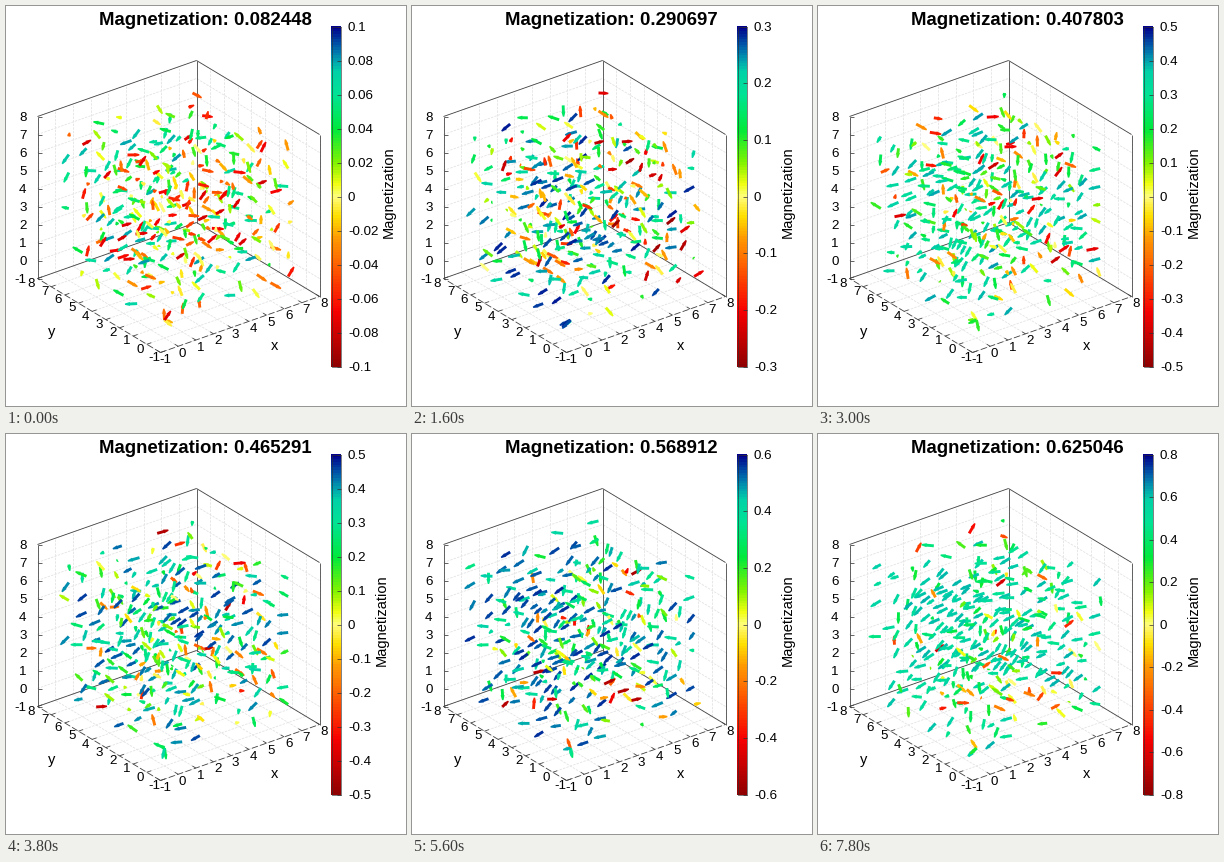
A matplotlib script for the animation above (8000 ms loop, 400x400 px).

```python
import numpy as np
import matplotlib.pyplot as plt
from matplotlib.animation import FuncAnimation
from matplotlib.collections import LineCollection, PolyCollection
from matplotlib.colors import LinearSegmentedColormap

SIZE, DPI = 400, 100
FRAMES, STEP_MS = 40, 200
N = 8                      # sites per lattice edge
LOW, HIGH = -1, 8          # axis limits
PX = 72 / DPI              # points per pixel

plt.rcParams["font.family"] = "Liberation Sans"

# Screen position of the front corner and the three unit vectors
ORIGIN = np.array([154, 346])
AXES = np.array([[159, -56], [-123, -74], [0, -162]]) / 9

STOPS = [
    (-1.0, "#900000"), (-0.68, "#f80000"), (-0.42, "#ff5c00"),
    (-0.25, "#ff9a00"), (-0.12, "#ffe000"), (0.0, "#ffff82"),
    (0.08, "#f0ff10"), (0.2, "#84f400"), (0.4, "#00ea3c"),
    (0.6, "#00e494"), (0.74, "#00d2a8"), (0.82, "#0094b0"),
    (0.9, "#0054a8"), (1.0, "#00008c"),
]
CMAP = LinearSegmentedColormap.from_list(
    "spin", [((v + 1) / 2, c) for v, c in STOPS], N=256)


def project(p):
    return ORIGIN + (np.asarray(p, float) - LOW) @ AXES


def unit(v):
    return v / np.linalg.norm(v, axis=-1, keepdims=True)


# ---- spin model -----------------------------------------------------------

rng = np.random.default_rng(12)
SITES = np.stack(np.meshgrid(*[np.arange(N)] * 3, indexing="ij"), -1)
EASY = unit(np.array([-0.95, 0.0, -0.3]))

# The lattice is diluted, and a few spins share the front corner
FILLED = rng.random((N, N, N)) < 0.7
POINTS = SITES[FILLED]
POINTS[:4] = 0
TAILS = project(POINTS)

# Spins around this core stay reversed for a long time
gap = POINTS - np.array([4.4, 2.2, 0])
gap[:, 2] = np.minimum(POINTS[:, 2], N - POINTS[:, 2])
WEIGHT = 1 - 1.8 * np.exp(-(gap ** 2).sum(-1, keepdims=True) / 4)
DISORDER = np.exp(0.55 * rng.normal(size=WEIGHT.shape))

MAGNETIZATION = np.interp(
    np.arange(FRAMES), [0, 5, 11, 19, 28, 34, 39],
    [0.082448, 0.231079, 0.350314, 0.465291, 0.568912, 0.610427, 0.625046])


def smooth(g):
    near = sum(np.roll(g, s, axis=a) for a in range(3) for s in (1, -1))
    f = (g + 0.3 * near)[FILLED]
    f = f - f.mean(0)
    return DISORDER * f / f.std()


def align(field, target):
    """Bias the field until its mean spin has the wanted length."""
    lo, hi = 0.0, 6.0
    for _ in range(25):
        mid = (lo + hi) / 2
        spins = unit(field + mid * WEIGHT * EASY)
        if np.linalg.norm(spins.mean(0)) < target:
            lo = mid
        else:
            hi = mid
    return spins


def simulate():
    noise = rng.normal(size=(N, N, N, 3))
    states = []
    for target in MAGNETIZATION:
        states.append(align(smooth(noise), target))
        flips = rng.random((N, N, N, 1)) < 0.25
        noise = np.where(flips, rng.normal(size=noise.shape), noise)
    return states


STATES = simulate()


def arrows(spins):
    """Outline of every arrow: a thick shaft with a small head."""
    d = 0.55 * spins @ AXES
    length = np.maximum(np.linalg.norm(d, axis=1, keepdims=True), 1.5)
    u = d / np.linalg.norm(d, axis=1, keepdims=True)
    n = u[:, ::-1] * [-1, 1]
    tip = TAILS + u * length
    neck = tip - u * np.minimum(5, length * 0.8)
    shaft, head = 1.45 * n, 2.0 * n
    return np.stack([TAILS + shaft, neck + shaft, neck + head, tip + 0.7 * n,
                     tip - 0.7 * n, neck - head, neck - shaft,
                     TAILS - shaft], axis=1) + 0.5


# ---- stage ----------------------------------------------------------------

fig = plt.figure(figsize=(SIZE / DPI, SIZE / DPI), dpi=DPI, facecolor="white")
ax = fig.add_axes([0, 0, 1, 1])


def text(x, y, s, px=13.33, **kw):
    return ax.text(x, y, s, fontsize=px * PX, color="black", **kw)


def lines(segments, color, width=1, dash="solid", z=1):
    item = LineCollection(np.asarray(segments, float) + 0.5, colors=color,
                          linewidths=width * PX, linestyles=dash, zorder=z)
    ax.add_collection(item)
    return item


def edges(pairs):
    return [project(p) for p in pairs]


def draw_box():
    grid, ticks = [], []
    for v in range(LOW, HIGH + 1):
        grid += edges([[(v, LOW, LOW), (v, HIGH, LOW)],
                       [(v, HIGH, LOW), (v, HIGH, HIGH)],
                       [(LOW, v, LOW), (HIGH, v, LOW)],
                       [(HIGH, v, LOW), (HIGH, v, HIGH)],
                       [(LOW, HIGH, v), (HIGH, HIGH, v)],
                       [(HIGH, LOW, v), (HIGH, HIGH, v)]])
        ticks += edges([[(v, LOW, LOW), (v, LOW + 0.25, LOW)],
                        [(LOW, v, LOW), (LOW + 0.25, v, LOW)]])
        x, y = project((LOW, HIGH, v))
        ticks.append([(x, y), (x + 4, y)])
        text(20.5, y + 4.8, v, ha="right")
        x, y = project((v, LOW, LOW))
        text(x + 5, y + 11, v, ha="center")
        x, y = project((LOW, v, LOW))
        text(x - 6, y + 8.8, v, ha="center")
    lines(grid, "#e2e2e2", 0.8, (0, (3, 1.5)))
    lines(ticks, "#404040", 0.8, z=2)

    a, b, c, d = [(LOW, LOW), (HIGH, LOW), (HIGH, HIGH), (LOW, HIGH)]
    solid = [((*p, h), (*q, h)) for p, q in ((b, c), (c, d))
             for h in (LOW, HIGH)]
    solid += [((*p, LOW), (*p, HIGH)) for p in (b, c, d)]
    front = [((*a, LOW), (*q, LOW)) for q in (b, d)]
    lines(edges(solid), "#404040", 0.8, z=2)
    lines(edges(front), "#404040", 0.8, (0, (8, 3)), z=2)


draw_box()
text(46, 330, "y", 14.67, ha="center")
text(268.5, 344.5, "x", 14.67, ha="center")
title = text(199.5, 18.8, "", 18.67, weight="bold", ha="center")

# Colour bar
BAR_L, BAR_R, BAR_T, BAR_B = 325, 334, 20, 360
ramp = CMAP(np.linspace(1, 0, 128))[:, None, :]
ax.imshow(ramp, extent=(BAR_L, BAR_R + 1, BAR_B + 1, BAR_T), aspect="auto",
          interpolation="nearest", zorder=1)
corners = [(BAR_L, BAR_T), (BAR_R, BAR_T), (BAR_R, BAR_B), (BAR_L, BAR_B)]
lines([corners + corners[:1]], "#303030", 0.6, z=3)
bar_ticks = lines([[(0, 0), (0, 0)]], "#303030", 0.7, z=3)
bar_labels = [text(342, 0, "") for _ in range(13)]
bar_name = text(383, 186.5, "Magnetization", 14.67, rotation=90,
                ha="center", va="center")

spins_art = PolyCollection([], linewidths=0, zorder=4)
ax.add_collection(spins_art)
ax.set_xlim(0, SIZE)
ax.set_ylim(SIZE, 0)
ax.axis("off")


def bar_scale(m):
    """Tick step and number of steps on each side of zero."""
    power = 10.0 ** np.floor(np.log10(2 * m))
    norm = 2 * m / power
    step = power * (0.2 if norm < 2 else 0.5 if norm < 5 else 1)
    return step, int(np.ceil(m / step))


def draw(k):
    m, spins = MAGNETIZATION[k], STATES[k]
    step, count = bar_scale(m)
    title.set_text(f"Magnetization: {m:.6f}")

    marks, widest = [], 0
    for i, label in enumerate(bar_labels):
        j = i - count
        label.set_visible(j <= count)
        if j <= count:
            y = (BAR_T + BAR_B) / 2 - j / count * (BAR_B - BAR_T) / 2
            value = f"{round(j * step, 4):g}"
            widest = max(widest, len(value))
            label.set_y(y + 4.8)
            label.set_text(value)
            marks.append([(BAR_R - 3.5, y + 0.5), (BAR_R + 0.5, y + 0.5)])
    bar_ticks.set_segments(marks)
    bar_name.set_x(348 + 7 * widest)

    level = spins @ unit(spins.mean(0)) * m / (step * count)
    spins_art.set_verts(arrows(spins))
    spins_art.set_facecolor(CMAP((level + 1) / 2))
    return [title, bar_ticks, bar_name, spins_art, *bar_labels]


anim = FuncAnimation(fig, draw, frames=FRAMES, interval=STEP_MS,
                     repeat=True, repeat_delay=0, blit=False)
plt.show()
```
